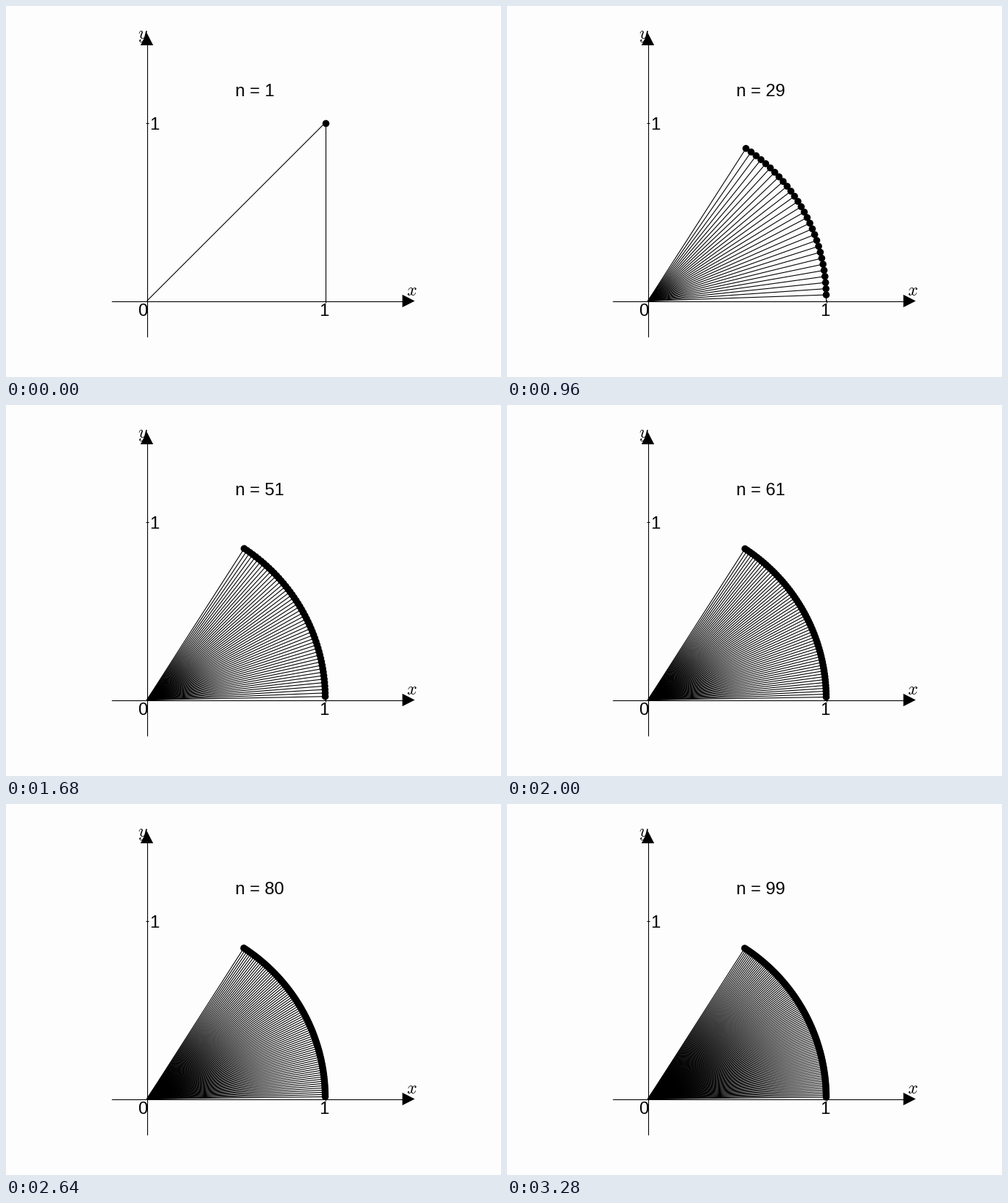
These frames come from a looping animation (680 by 510 pixels, 3.36 s). A matplotlib script:

```python
import numpy as np
import matplotlib.pyplot as plt
from matplotlib.animation import FuncAnimation
from matplotlib.collections import LineCollection

W, H, DPI = 680, 510, 80
PX = 72 / DPI              # one pixel in points
FRAMES, INTERVAL = 42, 80
STEP = 2.4                 # growth of n per frame
OX, OY, UNIT = 193, 405, 245
INK, PAPER = "black", "#fdfdfd"

plt.rcParams["mathtext.fontset"] = "cm"
plt.rcParams["path.simplify"] = False

fig = plt.figure(figsize=(W / DPI, H / DPI), dpi=DPI, facecolor=PAPER)
ax = fig.add_axes([0, 0, 1, 1])
ax.set_xlim(-0.5, W - 0.5)
ax.set_ylim(H - 0.5, -0.5)
ax.axis("off")


def line(xs, ys):
    ax.plot(xs, ys, color=INK, lw=1.1 * PX, solid_capstyle="butt")


def label(x, y, text, size=24):
    return ax.text(x, y, text, color=INK, fontsize=size * PX,
                   family="Liberation Sans", ha="left", va="baseline")


def arrowhead(points):
    ax.fill(*zip(*points), facecolor=INK, edgecolor="none")


def to_stage(z):
    return np.column_stack([OX + UNIT * z.real, OY - UNIT * z.imag])


# Axes, ticks and labels
line([144, 546], [OY, OY])
line([OX, OX], [454, 52])
line([OX - 2, OX + 2], [OY - UNIT] * 2)
line([OX + UNIT] * 2, [OY - 2, OY + 2])
arrowhead([(561, OY), (544, OY - 8.7), (544, OY + 8.7)])
arrowhead([(OX, 36.5), (OX - 8.7, 53.5), (OX + 8.7, 53.5)])
label(181, 425, "0")
label(430, 425, "1")
label(197, 170, "1")
label(549, 398, "$x$")
label(180.5, 45, "$y$")
counter = label(314.5, 124, "n = 1")

rays = LineCollection([], colors=INK, linewidths=1.1 * PX)
ax.add_collection(rays)
chain, = ax.plot([], [], color=INK, lw=1.1 * PX)
dots = ax.scatter([], [], color=INK, linewidths=0, zorder=3)


def draw(frame):
    """Powers of 1 + i/n, from the first to the n-th."""
    n = 1 + int(STEP * frame + 1e-6)
    pts = to_stage((1 + 1j / n) ** np.arange(n + 1))
    rays.set_segments([[(OX, OY), p] for p in pts[1:]])
    chain.set_data(pts[:, 0], pts[:, 1])
    dots.set_offsets(pts[1:])
    dots.set_sizes(np.full(n, (9.6 * PX) ** 2))
    counter.set_text(f"n = {n}")
    return rays, chain, dots, counter


anim = FuncAnimation(fig, draw, frames=FRAMES, interval=INTERVAL,
                     repeat=True, repeat_delay=0, blit=False)
plt.show()
```
